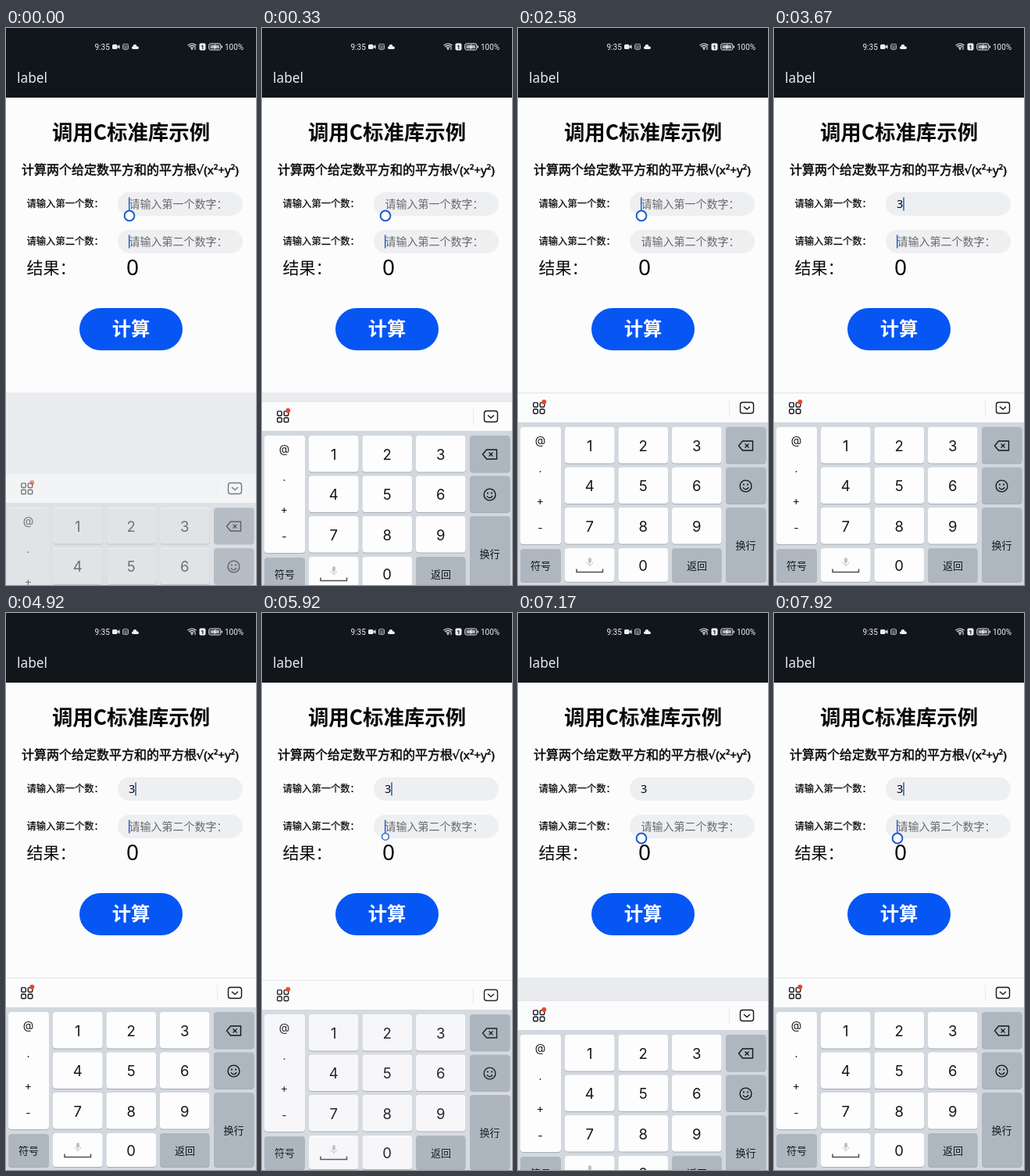
Write an HTML page with a canvas that moves like this. It is 320x712 px and loops after 8 s.

```html
<!DOCTYPE html>
<html lang="zh-CN">
<head>
<meta charset="utf-8">
<title>label</title>
<style>
html, body { margin: 0; width: 100%; height: 100%; overflow: hidden; background: #fcfcfd; }
canvas { display: block; width: 320px; height: 712px; }
</style>
</head>
<body>
<canvas id="stage"></canvas>
<script>
const W = 320, H = 712, LOOP = 8000;
const canvas = document.getElementById('stage');
const ctx = canvas.getContext('2d');
const dpr = window.devicePixelRatio || 1;
canvas.width = W * dpr;
canvas.height = H * dpr;

const CJK = '"Noto Sans CJK SC", "Noto Sans CJK JP", "Noto Sans CJK", sans-serif';
const LATIN = '"Noto Sans", "DejaVu Sans", sans-serif';
const DIGITS = 'Inter, "Noto Sans", sans-serif';
const PAGE = '#fcfcfd', DARK = '#11161b', FIELD = '#eeeff1', BLUE = '#0656f3';
const CARET = '#2a68c4', KEY = '#fdfdfe', GREY_KEY = '#aeb7c0', INK = '#14171a';

// Event times in ms
const TYPED = 3300, TAPPED = 5820, CLOSING = 5860, CLOSED = 6180, REOPENED = 6850;

// Vertical centres with and without the keyboard
const COMPACT = { title: 133, sub: 181, rows: [225, 273], fieldH: 30, radius: 15, result: 306, button: 385 };
const ROOMY = { title: 169, sub: 247, rows: [319, 387], fieldH: 49, radius: 19, result: 442, button: 570 };

const clamp = v => Math.max(0, Math.min(1, v));

// `thick` strokes the glyphs to give a medium weight
function text(str, x, midY, size, opt = {}) {
  const { weight = 400, family = CJK, color = '#08090a', align = 'left', thick = 0 } = opt;
  const y = midY + size * 0.365;
  ctx.font = `${weight} ${size}px ${family}`;
  ctx.textAlign = align;
  ctx.fillStyle = color;
  ctx.fillText(str, x, y);
  if (thick) {
    ctx.strokeStyle = color;
    ctx.lineWidth = thick;
    ctx.strokeText(str, x, y);
  }
}

function box(x, y, w, h, r, fill) {
  ctx.beginPath();
  ctx.roundRect(x, y, w, h, r);
  ctx.fillStyle = fill;
  ctx.fill();
}

function outline(x, y, w, h, r, color, width) {
  ctx.beginPath();
  ctx.roundRect(x, y, w, h, r);
  ctx.strokeStyle = color;
  ctx.lineWidth = width;
  ctx.stroke();
}

function dot(x, y, r, fill) {
  ctx.beginPath();
  ctx.arc(x, y, r, 0, 7);
  ctx.fillStyle = fill;
  ctx.fill();
}

function line(points, color, width) {
  ctx.beginPath();
  points.forEach(([x, y], i) => i ? ctx.lineTo(x, y) : ctx.moveTo(x, y));
  ctx.strokeStyle = color;
  ctx.lineWidth = width;
  ctx.stroke();
}

function arc(x, y, r, from, to, color, width) {
  ctx.beginPath();
  ctx.arc(x, y, r, from, to);
  ctx.strokeStyle = color;
  ctx.lineWidth = width;
  ctx.stroke();
}

function statusBar() {
  const c = '#eef0f2', dim = '#a9adb1';
  const opt = { family: 'Roboto, ' + LATIN, color: c };
  text('9:35', 113.5, 24.2, 10, opt);
  // camera
  box(136, 21, 6.5, 6, 1.5, c);
  ctx.beginPath();
  ctx.moveTo(142, 24);
  ctx.lineTo(145.5, 21.3);
  ctx.lineTo(145.5, 26.7);
  ctx.fill();
  // grid
  outline(149.5, 20.5, 7, 7, 1.5, dim, 1);
  line([[150, 23], [156, 23]], dim, 1);
  line([[150, 25.5], [156, 25.5]], dim, 0.8);
  line([[153, 23], [153, 27]], dim, 0.8);
  // cloud
  box(161, 23.4, 9, 3.6, 1.8, c);
  dot(165, 23.4, 2.4, c);
  // wifi
  [2.6, 5, 7.4].forEach(r => arc(238, 27.4, r, -2.4, -0.74, c, 1.2));
  dot(238, 27, 1.1, c);
  line([[242, 28], [242, 24]], c, 1);
  // badge
  box(247.5, 19.5, 8, 9, 1.8, c);
  text('1', 251.5, 24, 7.5, { family: LATIN, weight: 700, color: DARK, align: 'center' });
  // battery
  outline(259.8, 20, 15, 8, 2, c, 1);
  box(261.5, 21.7, 11.6, 4.6, 1, dim);
  box(275.8, 22.4, 1.2, 3.2, 0.5, c);
  line([[268.2, 21], [266, 24.2], [268.8, 24], [266.8, 27]], c, 1);
  text('100%', 280, 24.2, 10, opt);
}

function header() {
  ctx.fillStyle = DARK;
  ctx.fillRect(0, 0, W, 89);
  statusBar();
  text('label', 14, 63.6, 17.3, { family: LATIN, color: '#e8eaec' });
}

function caret(x, y, shown, handle) {
  if (shown) {
    ctx.fillStyle = CARET;
    ctx.fillRect(x - 0.8, y - 8.5, 1.6, 17);
  }
  if (handle > 0) {
    const cy = y + 8.5 + 6.5 * handle, r = 6.4 * handle;
    dot(158, cy, r, PAGE);
    arc(158, cy, r, 0, 7, '#1a5cc8', 2 * handle);
  }
}

function form(t, lay) {
  const typed = t >= TYPED;
  text('调用C标准库示例', 160, lay.title, 26.4, { weight: 700, align: 'center' });
  text('计算两个给定数平方和的平方根', 20, lay.sub, 16, { thick: 0.5 });
  text('√(x²+y²)', 243.5, lay.sub, 15.3, { family: LATIN, thick: 0.5 });

  ['一', '二'].forEach((n, i) => {
    const y = lay.rows[i];
    text(`请输入第${n}个数：`, 26.5, y, 12.3, { thick: 0.25 });
    box(143, y - lay.fieldH / 2, 160, lay.fieldH, lay.radius, FIELD);
    if (i === 0 && typed) text('3', 157, y, 14.5, { family: LATIN });
    else text(`请输入第${n}个数字：`, 157.5, y, 14, { color: '#68696c' });
  });

  text('结果：', 26.5, lay.result, 21);
  text('0', 162, lay.result, 28, { family: LATIN, align: 'center' });
  box(94, lay.button - 27, 132, 54, 27, BLUE);
  text('计算', 160, lay.button - 0.5, 24.3, { weight: 700, align: 'center', color: '#fcfcfd' });

  const late = (t + 480) % 1000 < 500;
  const early = (t + 20) % 1000 < 500;
  caret(typed ? 166 : 157.7, lay.rows[0], late, typed ? 0 : 1);
  caret(157.7, lay.rows[1], typed ? late : early, clamp((t - TAPPED) / 150));
}

function key(x, y, w, h, fill) {
  box(x, y + 1, w, h, 4, '#a6adb6');
  box(x, y, w, h, 4, fill);
}

function toolbar() {
  ctx.fillStyle = '#fcfcfd';
  ctx.fillRect(0, 466, W, 38);
  ctx.fillStyle = '#e2e4e8';
  ctx.fillRect(0, 466, W, 1);
  for (const x of [19.7, 28.2])
    for (const y of [478.9, 487.2]) outline(x, y, 5.6, 5.6, 1.3, INK, 1.4);
  dot(33.3, 478, 3, '#e5482f');
  ctx.fillStyle = '#e6e8eb';
  ctx.fillRect(270, 476, 1, 20);
  outline(284.5, 478.5, 17, 14, 3, INK, 1.4);
  line([[289, 484], [293, 487.6], [297, 484]], INK, 1.4);
}

function keys() {
  const mid = { family: DIGITS, color: INK, align: 'center' };
  const han = { color: INK, align: 'center' };
  const cols = [60, 128.5, 197], rows = [510, 561.5, 613, 665];

  key(3, 510, 52, 150, KEY);
  [['@', 527], ['.', 563], ['+', 603.5], ['-', 639]].forEach(([s, y]) => text(s, 28.5, y, 14, mid));
  key(3, 666, 52, 42, GREY_KEY);
  text('符号', 29, 687, 13, han);

  for (let n = 1; n <= 9; n++) {
    const x = cols[(n - 1) % 3], y = rows[Math.floor((n - 1) / 3)];
    key(x, y, 63.5, 46.5, KEY);
    text(String(n), x + 31.7, y + 24, 18.5, mid);
  }
  cols.forEach((x, i) => key(x, 665, 63.5, 43, i === 2 ? GREY_KEY : KEY));
  text('0', 160, 687, 18.5, mid);
  text('返回', 229, 687, 13, han);

  // space bar with microphone
  line([[75, 691.5], [75, 695.5], [108.5, 695.5], [108.5, 691.5]], '#4a4f55', 1.5);
  box(90, 677, 4, 7, 2, '#bdc2c8');
  arc(92, 682, 4, 0.2, 2.94, '#bdc2c8', 1);
  line([[92, 686], [92, 688.5]], '#bdc2c8', 1);

  // delete
  key(266, 510, 51.5, 46.5, GREY_KEY);
  ctx.lineJoin = 'round';
  line([[282.5, 534], [287.5, 528], [300.5, 528], [300.5, 540], [287.5, 540], [282.5, 534], [287.5, 528]], INK, 1.4);
  line([[290.5, 531.5], [295.5, 536.5]], INK, 1.3);
  line([[295.5, 531.5], [290.5, 536.5]], INK, 1.3);

  // emoji
  key(266, 561.5, 51.5, 46.5, GREY_KEY);
  arc(291.5, 585.5, 7.4, 0, 7, INK, 1.4);
  dot(288.9, 583.5, 1.1, INK);
  dot(294.1, 583.5, 1.1, INK);
  arc(291.5, 586, 3.6, 0.3, 2.84, INK, 1.3);

  key(266, 613, 51.5, 95, GREY_KEY);
  text('换行', 291.5, 661, 13, han);
}

function keyboard(offset, alpha) {
  ctx.save();
  ctx.globalAlpha = alpha;
  ctx.translate(0, Math.round(offset));
  ctx.fillStyle = '#d3d8df';
  ctx.fillRect(0, 504, W, 208);
  toolbar();
  keys();
  ctx.restore();
}

function openKeyboard(u) {
  ctx.fillStyle = '#eaecef';
  ctx.fillRect(0, 466, W, H - 466);
  keyboard(246 * Math.exp(-u / 150), clamp(u / 235));
}

function closeKeyboard(u) {
  const p = clamp(u / (CLOSED - CLOSING));
  ctx.fillStyle = PAGE;
  ctx.fillRect(0, 466, W, H - 466);
  keyboard(246 * Math.pow(p, 2.65), 1 - Math.pow(p, 1.6));
}

function draw(t) {
  ctx.setTransform(dpr, 0, 0, dpr, 0, 0);
  ctx.fillStyle = PAGE;
  ctx.fillRect(0, 0, W, H);
  header();
  const hidden = t >= CLOSED && t < REOPENED;
  form(t, hidden ? ROOMY : COMPACT);
  if (t < CLOSING) openKeyboard(t + 129);
  else if (t < CLOSED) closeKeyboard(t - CLOSING);
  else if (!hidden) openKeyboard(t - REOPENED);
}

const start = performance.now();
function tick() {
  draw((performance.now() - start) % LOOP);
  requestAnimationFrame(tick);
}
tick();
</script>
</body>
</html>
```
